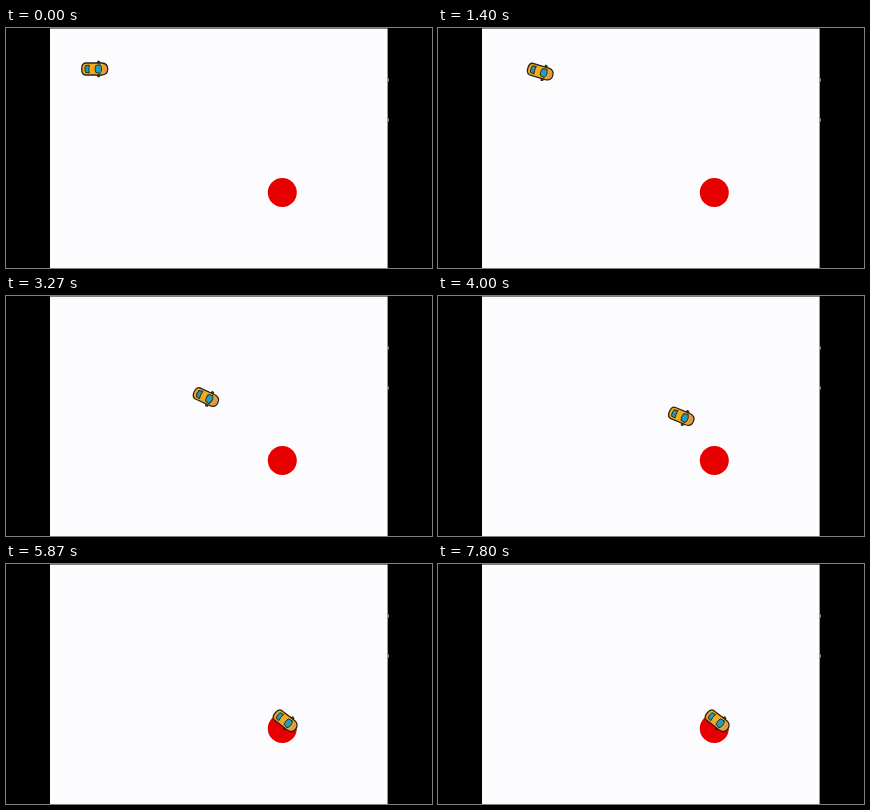
Animation of 426x240 px, one loop 7.87 s. Source, as an HTML page:

```html
<!DOCTYPE html>
<html lang="en">
<head>
<meta charset="utf-8">
<title>Car driving to a target</title>
<style>
  html, body { margin: 0; width: 100%; height: 100%; overflow: hidden; background: #000; }
  svg { display: block; width: 100%; height: 100%; }
</style>
</head>
<body>
<svg viewBox="0 0 426 240">
  <rect width="426" height="240" fill="#000"/>
  <rect x="44" y="0.5" width="337.6" height="239.5" fill="#fcfcfe"/>
  <path d="M381.5 50.5h1.2v3h-1.2zM381.5 90.5h1.2v3h-1.2z" fill="#bbb"/>
  <circle cx="276.3" cy="164.6" r="14.5" fill="#e80000"/>
  <g id="car" transform="translate(88.7 41)" stroke="#29221c" stroke-linejoin="round">
    <path d="M2.5 -5.5L3.3 -8L5 -7.5L5 -5.5M2.5 5.5L3.3 8L5 7.5L5 5.5" fill="#5a4020" stroke-width="1"/>
    <path d="M-9.5 -6H7C11.2 -5.8 13 -3.6 13 0C13 3.6 11.2 5.8 7 6H-9.5C-12 5.6 -13 3.2 -13 0C-13 -3.2 -12 -5.6 -9.5 -6Z" fill="#f2aa1e" stroke-width="1.3"/>
    <path d="M8 -4.7C11 -4 12.2 -2.4 12.2 0C12.2 2.4 11 4 8 4.7C9 2 9 -2 8 -4.7Z" fill="#d99a55" stroke="none"/>
    <path d="M-9.2 -3.4L-5.4 -3.9C-6 -1.3 -6 1.3 -5.4 3.9L-9.2 3.4C-10 1.2 -10 -1.2 -9.2 -3.4Z" fill="#2497b5" stroke-width="0.9"/>
    <path d="M1 -3.4L5.4 -4.4C7.4 -1.6 7.4 1.6 5.4 4.4L1 3.4C0.3 1.2 0.3 -1.2 1 -3.4Z" fill="#22a0c4" stroke-width="0.9"/>
  </g>
</svg>
<script>
  const LOOP = 7870, STEP = 200 / 3;
  const car = document.getElementById('car');

  // Waypoints: time (ms), position, heading (degrees), speed (px/ms)
  const route = [
    { t: 950, x: 88.7, y: 41, a: 0, v: 0.004 },
    { t: 1400, x: 102.3, y: 43.8, a: 17, v: 0.06 },
    { t: 2530, x: 157.3, y: 81, a: 26, v: 0.063 },
    { t: 4000, x: 243.4, y: 120.5, a: 23, v: 0.064 },
    { t: 4820, x: 279.4, y: 157, a: 38, v: 0.06 }
  ].map(p => {
    const r = p.a * Math.PI / 180;
    return { ...p, vx: p.v * Math.cos(r), vy: p.v * Math.sin(r) };
  });

  // Cubic Hermite value and slope for one axis
  function hermite(p, q, m, n, u) {
    const w = 1 - u;
    return [
      (1 + 2 * u) * w * w * p + u * w * w * m + u * u * (3 - 2 * u) * q - u * u * w * n,
      6 * u * w * (q - p) + w * (1 - 3 * u) * m + u * (3 * u - 2) * n
    ];
  }

  function pose(time) {
    const last = route.length - 1;
    const t = Math.min(Math.max(time, route[0].t), route[last].t);
    let i = 0;
    while (i < last - 1 && t >= route[i + 1].t) i++;
    const p = route[i], q = route[i + 1], d = q.t - p.t, u = (t - p.t) / d;
    const [x, dx] = hermite(p.x, q.x, p.vx * d, q.vx * d, u);
    const [y, dy] = hermite(p.y, q.y, p.vy * d, q.vy * d, u);
    return { x, y, a: Math.atan2(dy, dx) * 180 / Math.PI };
  }

  function draw() {
    const t = performance.now() % LOOP;
    const { x, y, a } = pose(Math.floor((t + 5) / STEP) * STEP);
    car.setAttribute('transform', `translate(${x.toFixed(2)} ${y.toFixed(2)}) rotate(${a.toFixed(2)})`);
    requestAnimationFrame(draw);
  }
  draw();
</script>
</body>
</html>
```
